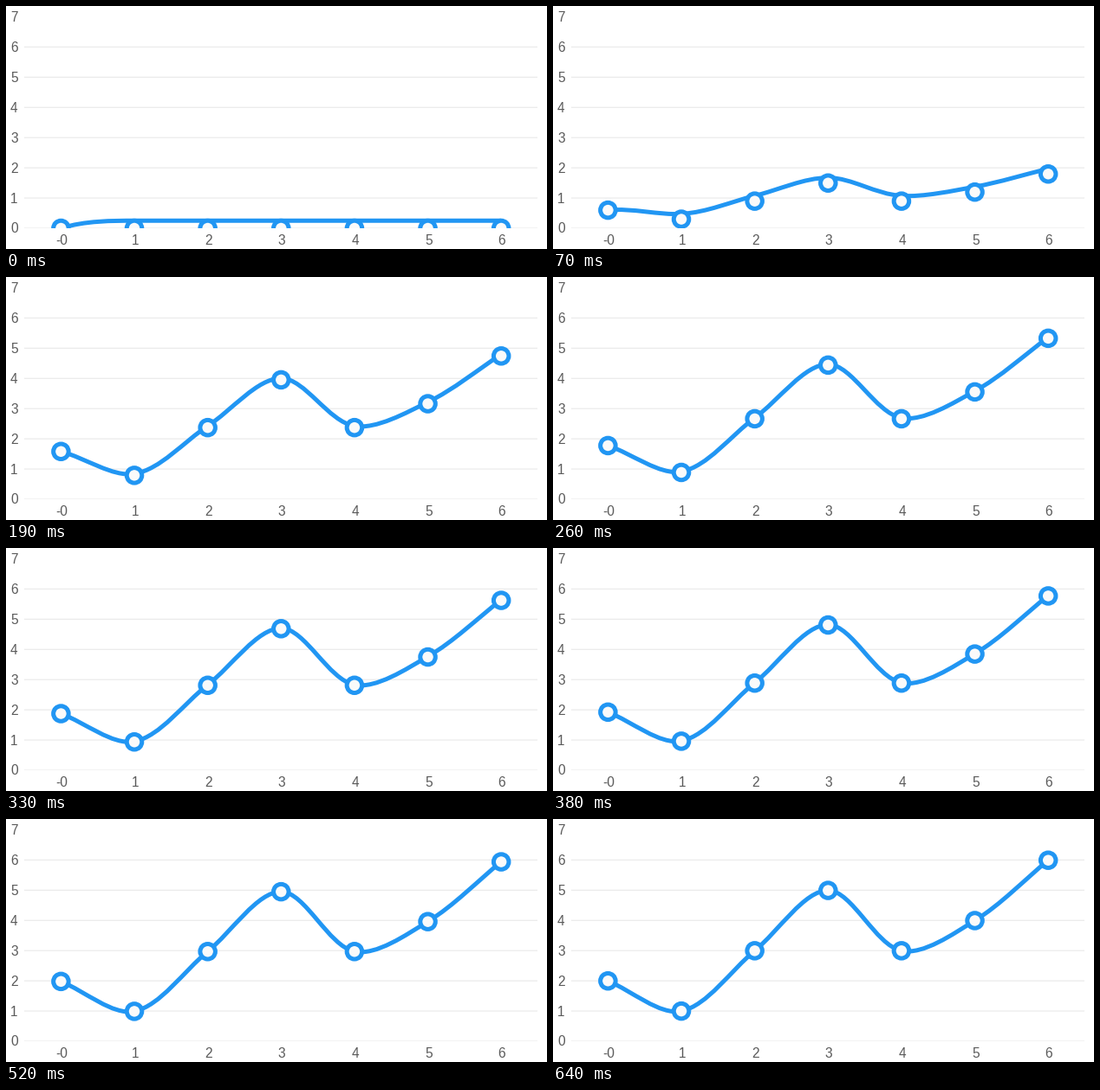
Animation of 624x281 px, one loop 710 ms. Source, as a matplotlib script:

```python
import numpy as np
import matplotlib.pyplot as plt
from matplotlib.animation import FuncAnimation
from matplotlib.patches import Circle, PathPatch, Rectangle
from matplotlib.path import Path

W, H, DPI = 624, 281, 64
PT = 72 / DPI                      # points per pixel
BASE, UNIT = 257, 34.93            # y of zero, pixels per value
LEFT, RIGHT = 21, 613
BLUE, TEXT, GRID = "#2196f3", "#5a5a5a", "#ebebeb"
RADIUS, STROKE, SMOOTH = 8.75, 5, 0.65

STEP_MS = 10
LOOP_MS = 710
DURATION = 800
# when each redraw shows, and how far the easing clock has run by then
SHOWN = [0, 70, 120, 190, 260, 330, 380, 450, 520, 590, 640]
CLOCK = [0, 41, 91, 180, 252, 318, 374, 445, 520, 590, 700]

values = np.array([2, 1, 3, 5, 3, 4, 6])
xs = 63.4 + 84.63 * np.arange(len(values))
points = np.column_stack([xs, BASE - UNIT * values])


def ease_out(u):
    return 1 - (2 ** (-10 * u) - 2 ** -10) / (1 - 2 ** -10)


def spline(pts):
    """Bezier vertices of a smoothed line through the points."""
    p = np.vstack([pts[:1], pts, pts[-1:]])
    mid = (p[:-1] + p[1:]) / 2
    size = np.hypot(*(p[1:] - p[:-1]).T)
    k = size[:-1] / (size[:-1] + size[1:])
    joint = mid[:-1] + (mid[1:] - mid[:-1]) * k[:, None]
    verts = [pts[0]]
    for i in range(len(pts) - 1):
        verts += [pts[i] + (mid[i + 1] - joint[i]) * SMOOTH,
                  pts[i + 1] + (mid[i + 1] - joint[i + 1]) * SMOOTH,
                  pts[i + 1]]
    return np.array(verts)


fig = plt.figure(figsize=(W / DPI, H / DPI), dpi=DPI, facecolor="white")
ax = fig.add_axes([0, 0, 1, 1])
ax.set(xlim=(0, W), ylim=(H, 0))
ax.axis("off")
area = Rectangle((LEFT, 0), RIGHT - LEFT, BASE, transform=ax.transData)


def label(x, y, s):
    ax.text(x, y + 5.5, s, ha="center", va="baseline", color=TEXT,
            family="Liberation Sans", size=15.5 * PT)


for v in range(8):
    y = BASE - UNIT * v
    label(9.3, y, str(v))
    if v < 7:
        line, = ax.plot([LEFT, RIGHT], [y, y], color=GRID, lw=1.25 * PT,
                        solid_capstyle="butt", snap=False)
        line.set_clip_path(area)
for i, x in enumerate(xs):
    label(x + 0.7, 271, str(i) if i else "-0")

target = spline(points)
codes = [Path.MOVETO] + [Path.CURVE4] * (len(target) - 1)
curve = PathPatch(Path(target, codes), fc="none", ec=BLUE, lw=STROKE * PT,
                  capstyle="butt", joinstyle="round", zorder=3)
dots = [Circle(p, RADIUS, fc="#fafafa", ec=BLUE, lw=STROKE * PT, zorder=4)
        for p in points]
for patch in [curve, *dots]:
    ax.add_patch(patch)
    patch.set_clip_path(area)

# the curve rises from one radius above the baseline, except its first point
start_y = np.full(len(target), BASE - RADIUS)
start_y[0] = BASE


def draw(n):
    step = np.searchsorted(SHOWN, n * STEP_MS, side="right") - 1
    p = ease_out(CLOCK[step] / DURATION)
    verts = target.copy()
    verts[:, 1] = start_y + (target[:, 1] - start_y) * p
    curve.set_path(Path(verts, codes))
    for dot, (x, y) in zip(dots, points):
        dot.center = x, BASE + (y - BASE) * p
    return [curve, *dots]


anim = FuncAnimation(fig, draw, frames=LOOP_MS // STEP_MS, interval=STEP_MS,
                     repeat=True, repeat_delay=0, blit=False)
plt.show()
```
